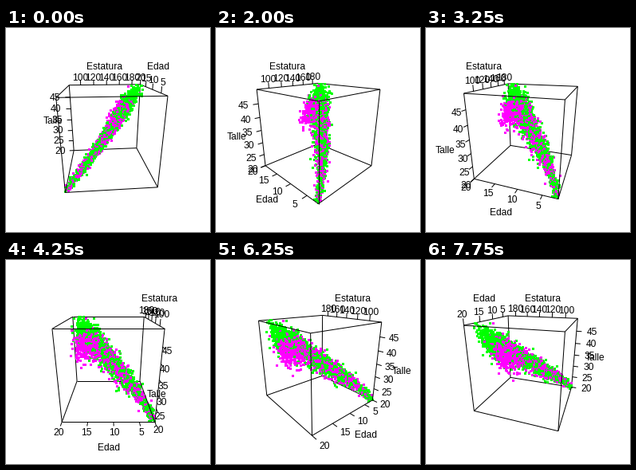
Animation, 256 px wide and 256 px high, one loop 8 s. Source, as a matplotlib script:

```python
import itertools
import numpy as np
import matplotlib.pyplot as plt
from matplotlib.animation import FuncAnimation
from matplotlib.collections import LineCollection

SIZE, FRAMES, INTERVAL = 256, 32, 250
DIST, FOCAL, TILT = 4.526, 229, np.radians(20)
CENTER = 128.5
MARK = 2 / 15  # tick length in box units
PX = 0.72      # points per pixel at 100 dpi
FONT = 12
GREEN, MAGENTA = "#00ff00", "#ff00ff"

HEIGHT = {
    MAGENTA: ([2, 6, 10, 12, 14, 20], [85, 114, 138, 150, 157, 159]),
    GREEN: ([2, 6, 10, 13, 15, 17, 20], [85, 115, 138, 156, 168, 173, 175]),
}
COUNT = {MAGENTA: 950, GREEN: 1250}

# Data values to box coordinates in -1..1
to_x = lambda v: (np.asarray(v) - 138) / 55.5
to_y = lambda v: (np.asarray(v) - 11) / 9
to_z = lambda v: (np.asarray(v) - 35) / 15

rng = np.random.default_rng(7)


def make_cloud(color):
    count = COUNT[color]
    age = 2 + 16.4 * rng.beta(1.4, 1.0, count)
    age[:10] = rng.uniform(18, 20, 10)
    height = np.interp(age, *HEIGHT[color])
    height = height + rng.normal(0, 1, count) * np.interp(age, [2, 12, 20], [3.5, 7, 7])
    size = 20.8 + 0.262 * (height - 84) + rng.normal(0, 1, count) * np.interp(age, [2, 14], [0.9, 1.8])
    pts = np.stack([to_x(height), to_y(age), to_z(size)], axis=1)
    return np.clip(pts, -1, 1)


CLOUD = np.concatenate([make_cloud(MAGENTA), make_cloud(GREEN)])
COLORS = np.repeat([MAGENTA, GREEN], [COUNT[MAGENTA], COUNT[GREEN]])

CORNERS = list(itertools.product((-1, 1), repeat=3))
EDGES = [(a, b) for a, b in itertools.combinations(CORNERS, 2)
         if sum(p != q for p, q in zip(a, b)) == 1]


def spin(p, a):
    x, y, z = np.moveaxis(np.asarray(p, float), -1, 0)
    return x * np.cos(a) - y * np.sin(a), x * np.sin(a) + y * np.cos(a), z


def project(p, a):
    """Screen position and depth of box points turned by angle a."""
    x, y, z = spin(p, a)
    depth = DIST + y * np.cos(TILT) - z * np.sin(TILT)
    up = z * np.cos(TILT) + y * np.sin(TILT)
    screen = np.stack([CENTER + FOCAL * x / depth, CENTER - FOCAL * up / depth], axis=-1)
    return screen, depth


fig = plt.figure(figsize=(SIZE / 100, SIZE / 100), dpi=100, facecolor="white")
ax = fig.add_axes([0, 0, 1, 1])


def write(x, y, text):
    ax.text(x, y + 4.3, text, ha="center", va="baseline", color="black",
            family="Liberation Sans", fontsize=FONT * PX, zorder=5)


def lines(segments, z):
    ax.add_collection(LineCollection(segments, colors="black", linewidths=PX, zorder=z))


def draw_axis(a, title, values, place, out, kind):
    """Ticks, labels and title along the edge given by place(t)."""
    out = np.array(out, float)
    ticks = []
    lean = spin(out, a)[0]
    for value, base in values:
        p = np.array(place(base), float)
        ticks.append(project([p, p + MARK * out], a)[0])
        x, y = project(p + 2 * MARK * out, a)[0]
        half = FONT * 0.278 * len(str(value))
        if kind != "top":
            x += np.sign(lean) * half * np.clip(1.6 * abs(lean) - 0.45, 0, 1)
        write(x, y + {"top": 2.8, "bottom": 2, "side": -0.8}[kind], str(value))
    lines(ticks, 4)

    mid = np.array(place(0), float)
    x, y = project(mid + 4 * MARK * out, a)[0]
    if kind == "top":
        x, y = x + 6.5 * spin(mid, a)[0], y + 2
    elif kind == "bottom":
        y += 8.5
    else:
        x += np.sign(lean) * 13.5 * (1 - abs(lean))
    write(x, y, title)


def scale(values, convert):
    return [(v, float(convert(v))) for v in values]


def draw(i):
    ax.cla()
    ax.set_xlim(0, SIZE)
    ax.set_ylim(SIZE, 0)
    ax.axis("off")
    deg = 5 + 5 * i
    a = np.radians(deg)

    near, far = [], []
    for edge in EDGES:
        seg, _ = project(edge, a)
        in_front = spin(np.mean(edge, axis=0), a)[1] < 0
        (near if in_front else far).append(seg)
    lines(far, 1)
    lines(near, 3)

    pos, depth = project(CLOUD, a)
    order = np.argsort(-depth)
    pos = np.floor(pos[order]) + 0.5
    ax.scatter(pos[:, 0], pos[:, 1], s=(3 * PX) ** 2, c=COLORS[order], marker="s",
               linewidths=0, antialiased=False, zorder=2)

    side = 1 if np.cos(a) > 1e-9 else -1
    draw_axis(a, "Estatura", scale(range(100, 181, 20), to_x),
              lambda t: (t, side, 1), (0, 0, 1), "top")
    draw_axis(a, "Talle", scale(range(20, 46, 5), to_z),
              lambda t: (-1, side, t), (-1, 0, 0), "side")
    ages = scale(range(5, 21, 5), to_y)
    if 25 <= deg <= 155:
        draw_axis(a, "Edad", ages, lambda t: (-1, t, -1), (-1, 0, 0), "bottom")
    else:
        draw_axis(a, "Edad", ages, lambda t: (1, t, 1), (0, 0, 1), "top")
    return []


anim = FuncAnimation(fig, draw, frames=FRAMES, interval=INTERVAL,
                     init_func=lambda: [], repeat=True, repeat_delay=0)
plt.show()
```
